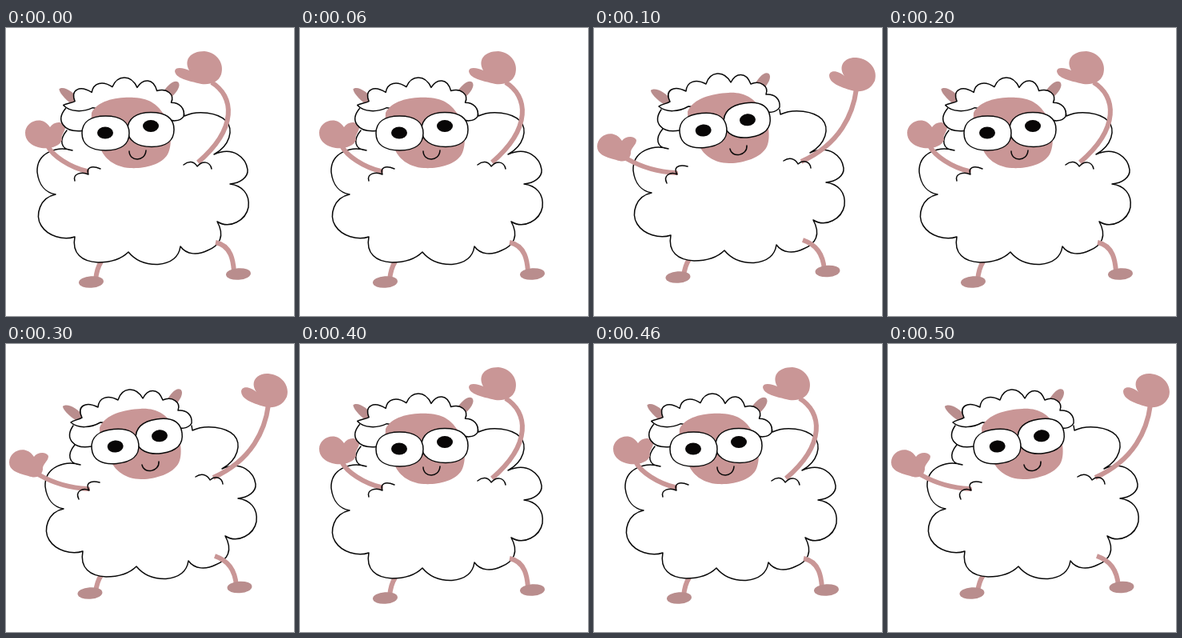
These frames come from a looping animation (360 px wide and 360 px high, 600 ms). An HTML page:

```html
<!DOCTYPE html>
<html lang="en">
<head>
<meta charset="utf-8">
<title>Dancing sheep</title>
<style>
  html, body { margin: 0; width: 100%; height: 100%; overflow: hidden; background: #fff; }
  svg { display: block; width: 100vw; height: 100vh; }
  .line { fill: none; stroke: #080808; stroke-width: 1.5; stroke-linecap: round; stroke-linejoin: round; }
  .wool { fill: #fff; }
  .skin { fill: #c99696; }
  .dark { fill: #b98d8d; }
  .limb { fill: none; stroke: #c99696; stroke-width: 6; }
  .pupil { fill: #080606; }
</style>
</head>
<body>
<svg viewBox="0 0 360 360">
  <path id="legL" class="limb"/>
  <ellipse id="footL" class="dark" rx="15.5" ry="7.3"/>

  <path id="body" class="line wool" d="M76 128C66 140 68 152 83 153C65 147 38 155 39 180C41 197 50 206 62 208
    C42 212 36 234 44 247C52 260 72 266 86 261C82 282 95 292 115 293C132 293 145 288 153 280
    C162 291 175 296 190 295.500C205 294 216 287 218 273C226 284 240 284 252 278
    C267 272 274 260 264 242C280 252 300 240 303 224C305 207 295 197 280 195
    C292 194 303 187 302 177C300 163 285 147 260 158C280 147 285 127 275 116C265 106 240 102 223 110L222 104"/>

  <path id="legR" class="limb"/>
  <ellipse id="footR" class="dark" rx="15.5" ry="7.3"/>
  <path id="armL" class="limb" stroke-linecap="round"/>
  <path id="handL" class="skin"/>
  <path id="armR" class="limb"/>
  <path id="handR" class="skin"/>
  <path id="tuftL" class="line"/>
  <path id="tuftR" class="line"/>

  <path id="earL" class="dark" d="M-14 0C-12 -7 4 -7 14 -3V7C4 7 -10 5 -14 0Z"/>
  <path id="earR" class="dark" d="M-11 -6C0 -8 11 -6 11 0C10 6 0 7 -11 6Z"/>
  <g id="wool">
    <path class="line wool" d="M84 102C73 118 84 132 107 128L120 110"/>
    <path class="line wool" d="M81 98C85 95 90 95 95 92C88 78 99 71 115 79C116 67 127 63 140 70
      C145 54 162 52 171 68C177 56 190 54 196 70C208 65 219 73 215 83
      C226 82 233 89 232 99C228 106 218 107 208 103L118 98C106 105 90 106 81 98Z"/>
  </g>
  <path id="face" class="skin" d="M107 106C115 90 140 86 160 87C182 88 190 98 196 106
    C208 122 208 148 202 158C194 172 170 176 155 175C135 174 122 162 118 150C108 135 106 120 107 106Z"/>
  <path id="eyeR" class="line wool" d="M-29 0C-29 -14 -18 -21.500 0 -21.500C19 -21.500 29 -14 29 0C29 14 19 21.500 1 21.500C-17 21.500 -29 14 -29 0Z"/>
  <path id="eyeL" class="line wool" d="M-29.500 0C-29.500 -14 -19 -21.500 0 -21.500C19 -21.500 29.500 -14 29.500 0C29.500 14 19 21.500 0 21.500C-19 21.500 -29.500 14 -29.500 0Z"/>
  <ellipse id="pupilL" class="pupil" rx="10" ry="7.5"/>
  <ellipse id="pupilR" class="pupil" rx="10" ry="7.5"/>
  <path id="mouth" class="line"/>
</svg>
<script>
const STEP = 100;

// Arms raised, then arms spread
const poses = [
  {
    move: {
      body: "",
      wool: "translate(157 131) rotate(5) translate(-169 -125)",
      face: "",
      earL: "translate(78 84) rotate(34)",
      earR: "translate(208 76) rotate(-48)",
      eyeL: "translate(124.5 131.5)",
      eyeR: "translate(181 127)",
      pupilL: "translate(124 131)",
      pupilR: "translate(181 122.5)",
      footL: "translate(106.5 317.5) rotate(-4)",
      footR: "translate(290.5 307.5) rotate(-4)"
    },
    shape: {
      mouth: "M154 154C154 167 174 168 175 153",
      legL: "M119 292C115 298 113 305 112 315",
      legR: "M262 268C282 272 284 292 285 304",
      armL: "M52 147C58 160 80 174 101 179",
      handL: "M24 131C24 117 45 108 55 124C60 116 72 116 74 124C74 130 68 134 70 140C66 150 50 152 40 149C30 146 24 140 24 131Z",
      armR: "M257 68C285 85 290 125 240 168",
      handR: "M211 54C212 47 224 51 229 53C222 40 230 29 248 29C265 31 273 45 269 58C265 70 250 72 240 69C228 66 212 63 211 54Z",
      tuftL: "M86 191C83 182 95 179 103 183C100 175 106 171 118 176",
      tuftR: "M222 171C228 166 235 166 239 173C246 165 255 167 257 176"
    }
  },
  {
    move: {
      body: "translate(10 -2)",
      wool: "",
      face: "translate(169 125) rotate(-5) translate(-157 -131)",
      earL: "translate(83 85) rotate(30)",
      earR: "translate(212 66) rotate(-54)",
      eyeL: "translate(136.5 128) rotate(-5)",
      eyeR: "translate(191.3 115.3) rotate(-8)",
      pupilL: "translate(136.7 128) rotate(-5)",
      pupilR: "translate(192 114.8) rotate(-5)",
      footL: "translate(105 311.5) rotate(-4)",
      footR: "translate(292 304) rotate(-4)"
    },
    shape: {
      mouth: "M170 151C172 163 192 160 191 147",
      legL: "M119 289C115 295 113 302 112 310",
      legR: "M261 265C278 271 286 282 288 302",
      armL: "M42 164C60 174 80 180 102 181",
      handL: "M4 148C4 133 25 125 35 141C39 135 50 134 53 140C53 147 45 150 46 157C44 167 36 168 28 165C12 161 4 157 4 148Z",
      armR: "M328 76C324 107 308 145 259 167",
      handR: "M294 59C295 51 307 54 313 60C304 47 314 36 328 37C346 39 355 53 351 66C345 79 332 81 322 78C308 74 294 69 294 59Z",
      tuftL: "M91 194C86 184 96 179 104 183C99 175 104 170 117 173",
      tuftR: "M237 166C244 161 251 163 255 170C262 164 270 167 271 175"
    }
  }
];

const set = (values, attribute) => {
  for (const id in values) document.getElementById(id).setAttribute(attribute, values[id]);
};

let shown = -1;

function draw(time) {
  const index = Math.floor(time / STEP) % poses.length;
  if (index === shown) return;
  shown = index;
  set(poses[index].move, "transform");
  set(poses[index].shape, "d");
}

const start = performance.now();
function tick() {
  draw(performance.now() - start);
  requestAnimationFrame(tick);
}
tick();
</script>
</body>
</html>
```
